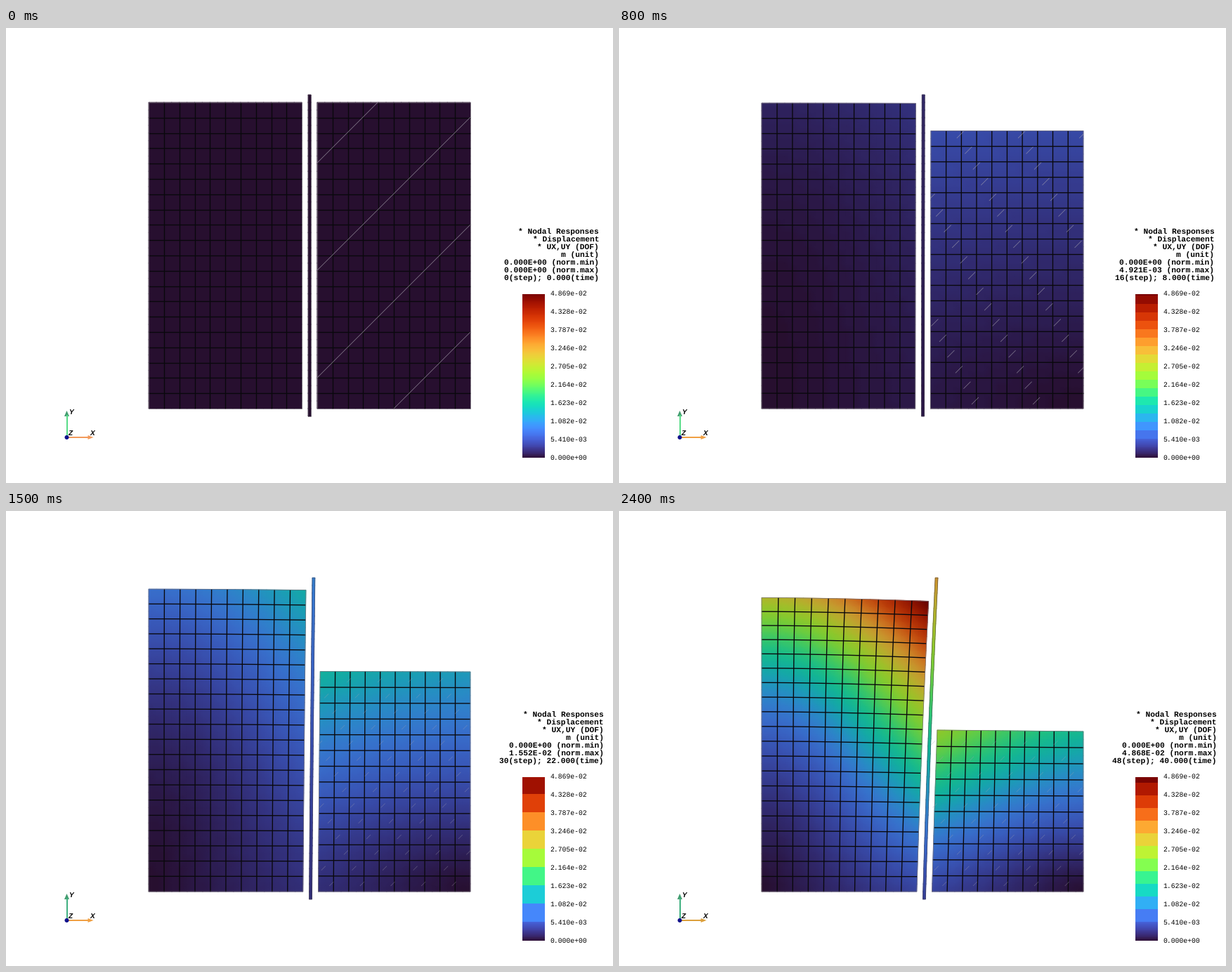
Recreate the animation shown at these times as a matplotlib script. Size 864 by 648 pixels, loop 2450 ms.

```python
import math
import numpy as np
import matplotlib as mpl
import matplotlib.pyplot as plt
from matplotlib.animation import FuncAnimation
from matplotlib.collections import LineCollection
from matplotlib.colors import ListedColormap
from matplotlib.patches import Circle, Polygon, Rectangle

mpl.rcParams["text.hinting"] = "none"

W, H, DPI = 864, 648, 100
PX = 72 / DPI                      # points per pixel
STEPS, GRAVITY_STEPS, STEPS_PER_LAYER = 49, 8, 4
ROWS, COLS = 20, 10
CELL = 21.8
BASE, MID = 542, 432               # soil base and wall axis
SCALE = 610                        # pixels per metre of displacement
PEAK = 0.04869

# per number of excavated layers: left corner travel in pixels, largest norm
SWAY = [0, 0.8, 1.8, 3.2, 4.5, 6.4, 8.8, 12.5, 17.2, 22.6, 29.6]
NORM = [0, 2.508e-3, 4.921e-3, 7.317e-3, 9.702e-3, 1.217e-2, 1.552e-2,
        2.069e-2, 2.798e-2, 3.703e-2, 4.868e-2]
SETTLE = 2.118e-2
BAND = [2, 12, 12, 13, 20, 26, 26, 26, 26, 26, 18]

turbo = plt.get_cmap("turbo")
shaded = ListedColormap(turbo(np.linspace(0, 1, 256))[:, :3] * 0.8)

fig = plt.figure(figsize=(W / DPI, H / DPI), dpi=DPI, facecolor="white")
ax = fig.add_axes([0, 0, 1, 1])
ax.set_xlim(0, W)
ax.set_ylim(H, 0)
ax.axis("off")
ax.autoscale(False)


def mono(x, y, s, size, **kw):
    return ax.text(x, y, s, family="Liberation Mono", fontsize=size * PX,
                   va="baseline", color="black", **kw)


def wall_shift(y, n):
    """Sideways travel of the wall at relative height y."""
    foot = 0.27 * n
    return foot + (0.66 * SWAY[n] - foot) * (0.75 * y + 0.25 * y * y)


def settlement(y):
    return -SETTLE * SCALE * (2 * y - y * y)


def left_field(x, y, n, gravity):
    if gravity:
        return 0 * x, settlement(y)
    far = 0.59 * SWAY[n] * (0.25 * y + 0.75 * y ** 3)
    near = 0.76 * SWAY[n] * (0.4 * y + 0.6 * y * y)
    ux = wall_shift(y, n) * x ** (1 + 1.2 * y * (1 - y))
    return ux, -(far + (near - far) * x ** 1.7)


def right_field(x, y, n, gravity):
    if gravity:
        return 0 * x, settlement(y)
    heave = (0.08 + 0.002 * n) * n * (20 - n)
    tilt = 1 + 0.2 * (n / 10) ** 2 * (1 - x)
    rise = (y / (1 - n / ROWS)) ** 1.25
    return wall_shift(y, n) * (1 - x), heave * rise * tilt


def paint(px, py, size):
    return ax.pcolormesh(px, py, np.clip(size / (PEAK * SCALE), 0, 1),
                         shading="gouraud", cmap=shaded, vmin=0, vmax=1)


def rim(px, py, color, width):
    xs = np.concatenate([px[0], px[:, -1], px[-1, ::-1], px[::-1, 0]])
    ys = np.concatenate([py[0], py[:, -1], py[-1, ::-1], py[::-1, 0]])
    return ax.plot(xs, ys, color=color, lw=width * PX)[0]


def block(x0, rows, field, n, gravity):
    x, y = np.meshgrid(np.linspace(0, 1, 2 * COLS + 1),
                       np.linspace(0, rows / ROWS, 2 * rows + 1))
    ux, uy = field(x, y, n, gravity)
    px = x0 + x * COLS * CELL + ux
    py = BASE - y * ROWS * CELL - uy
    lines = [np.column_stack([px[i], py[i]]) for i in range(2, 2 * rows, 2)]
    lines += [np.column_stack([px[:, j], py[:, j]])
              for j in range(2, 2 * COLS, 2)]
    mesh = LineCollection(lines, colors="#09080c", linewidths=1.35 * PX)
    fill = paint(px, py, np.hypot(ux, uy))
    ax.add_collection(mesh, autolim=False)
    return [fill, mesh, rim(px, py, "#77727a", 0.7)], py[-1].min()


def wall(n):
    y = np.linspace(-0.025, 1.025, 43)[:, None] * np.ones((1, 2))
    shift = wall_shift(y, n)
    px = MID + shift + np.array([-1.9, 1.9])
    py = BASE - y * ROWS * CELL
    return [paint(px, py, np.abs(shift)), rim(px, py, "#4a4450", 0.5)]


def streaks(step, n, top):
    """Light hairlines along the cell diagonals of the right block."""
    x0, x1 = MID + CELL / 2, MID + CELL / 2 + COLS * CELL
    alpha = 0.75
    if step == 0:
        segs = [[(x0, c - x0), (x1, c - x1)] for c in 635 + 153 * np.arange(4)]
    else:
        if n < 2:
            half = 13
            spots = [(459 + 9.3 * k - 0.17 * k * k + dx,
                      526 - 32 * k + 0.23 * k * k)
                     for k in range(16) for dx in (-112, 0, 120)]
        else:
            half = 5 if n < 4 else 3
            alpha = 0.7 if n < 4 else 0.4
            period = 4 * CELL if n < 5 else 2 * CELL
            spots = [(x0 + (64 - 11.5 * r) % period + k * period,
                      531 - 22.3 * r)
                     for r in range(ROWS - n) for k in range(5)]
        segs = [[(x - half, y + half), (x + half, y - half)] for x, y in spots]
    lines = LineCollection(segs, colors="#aaa6b0", linewidths=0.7 * PX,
                           alpha=alpha)
    ax.add_collection(lines, autolim=False)
    lines.set_clip_path(Rectangle((x0, top), x1 - x0, BASE - top,
                                  transform=ax.transData))
    return lines


def bar_colors(n):
    """Colour scale in bands, smooth at its low end."""
    v = np.arange(233) + 0.5
    smooth = 27
    banded = smooth + (np.floor((v - smooth) / BAND[n]) + 0.5) * BAND[n]
    level = np.where(v < smooth, v, banded)
    return turbo(np.clip(level / 233, 0, 1))[::-1, None, :3]


bar = ax.imshow(bar_colors(0), extent=(735, 767, 612, 379), aspect="auto",
                interpolation="nearest")
ax.set_xlim(0, W)
ax.set_ylim(H, 0)
for k in range(10):
    mono(774.5, 380.5 + 26 * k, f"{PEAK * (9 - k) / 9:.3e}", 9.8)

HEAD = ["* Nodal Responses", "* Displacement", "* UX,UY (DOF)", "m (unit)",
        "0.000E+00 (norm.min)", "", ""]
notes = [mono(844, 294 + 11 * i, s, 11.22, weight="bold", ha="right")
         for i, s in enumerate(HEAD)]

# axis triad
y_axis, = ax.plot([86.5, 86.5], [583, 552], lw=2 * PX)
x_axis, = ax.plot([86.5, 117], [583, 583], lw=2 * PX)
ax.add_patch(Polygon([(83, 553), (90, 553), (86.5, 545)], color="#439c70", lw=0))
x_tip = ax.add_patch(Polygon([(116.5, 580), (116.5, 586), (124.5, 583)], lw=0))
ax.add_patch(Circle((86.5, 583), 3, color="#10108c", lw=0, zorder=5))
for name, x, y in (("Y", 92, 549.5), ("X", 122.5, 579.5), ("Z", 91, 579.5)):
    ax.text(x, y, name, family="Liberation Sans", weight="bold",
            style="italic", fontsize=10 * PX, ha="center", va="baseline")

moving = []


def draw(step):
    while moving:
        moving.pop().remove()
    gravity = 0 < step <= GRAVITY_STEPS
    n = max(0, math.ceil((step - GRAVITY_STEPS) / STEPS_PER_LAYER))
    time = step if step <= GRAVITY_STEPS else step - GRAVITY_STEPS

    left, _ = block(MID - (COLS + 0.5) * CELL, ROWS, left_field, n, gravity)
    right, top = block(MID + 0.5 * CELL, ROWS - n, right_field, n, gravity)
    moving.extend(left + right + wall(n))
    moving.append(streaks(step, n, top))

    notes[5].set_text(f"{SETTLE if gravity else NORM[n]:.3E} (norm.max)")
    notes[6].set_text(f"{step}(step); {time:.3f}(time)")
    edge = 776.8 + len(notes[6].get_text()) * 6.73 / 2
    for note in notes:
        note.set_x(edge)

    bar.set_data(bar_colors(n))
    y_axis.set_color("#58dc88" if n < 4 else "#40b080")
    orange = "#f29a5c" if step < 9 else "#f0a044" if n < 8 else "#dca03c"
    x_axis.set_color(orange)
    x_tip.set_color(orange)
    return moving


anim = FuncAnimation(fig, draw, frames=STEPS, interval=50,
                     init_func=lambda: [], repeat=True, blit=False)
plt.show()
```
